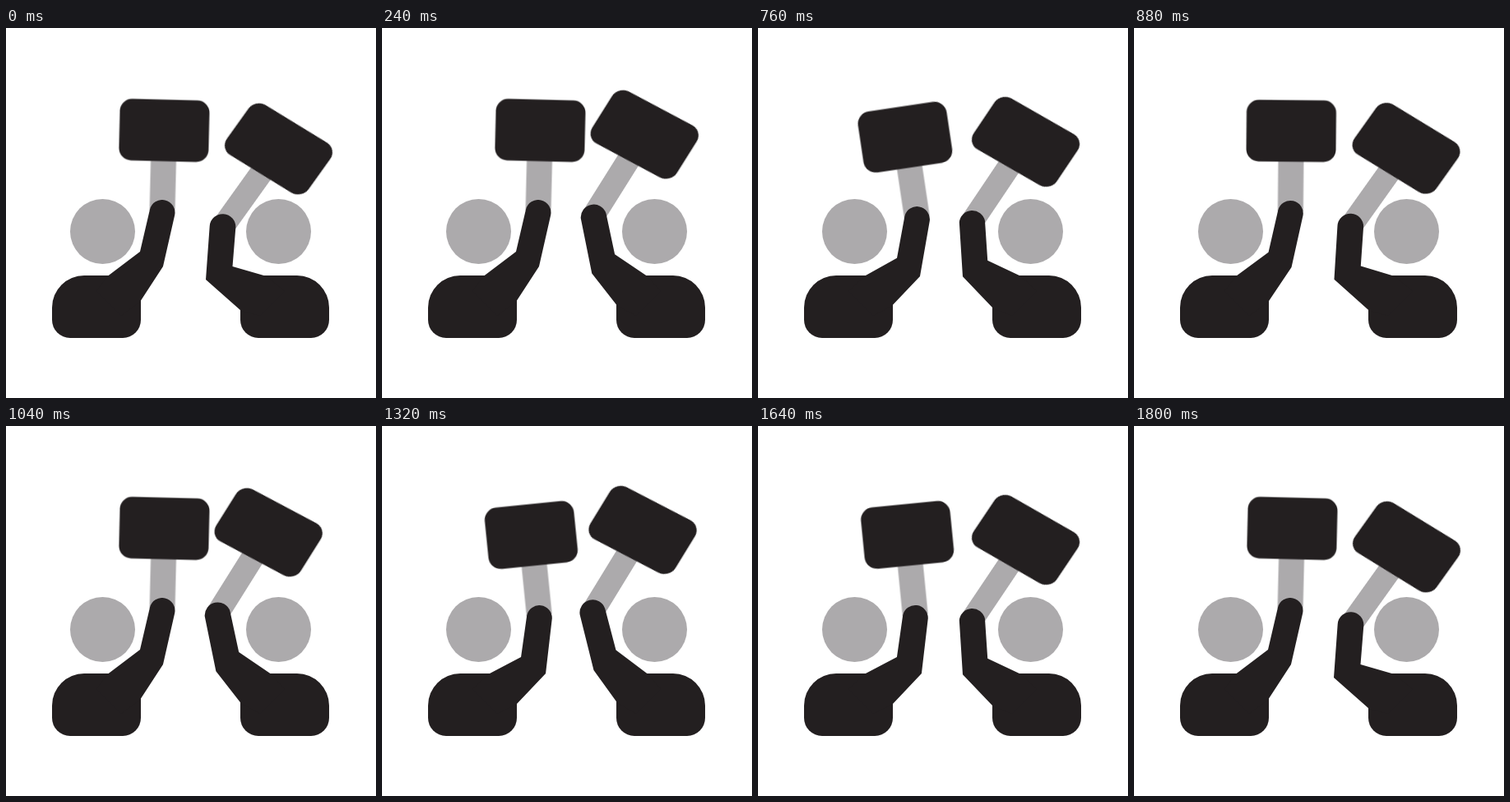
These frames come from a looping animation (450 by 450 pixels, 1.92 s). An HTML page without scripts:

```html
<!DOCTYPE html>
<html lang="en">
<head>
<meta charset="utf-8">
<title>Two people waving signs</title>
<style>
  html, body { margin: 0; width: 100%; height: 100%; overflow: hidden; background: #fff; }
  svg { display: block; width: 100vw; height: 100vh; }
  .ink { fill: #231f20; }
  .grey { fill: #acaaac; }

  .move { animation: 1920ms cubic-bezier(.333, 0, .667, 1) infinite; }
  .arm-l { animation-name: arm-l; }
  .sign-l { animation-name: sign-l; }
  .arm-r { animation-name: arm-r; }
  .sign-r { animation-name: sign-r; }

  /* Left: rest to 320 ms, down at 640, up at 920, rest to 1160, down at 1480, up at 1800 */
  @keyframes arm-l {
    0%, 16.667%, 47.917%, 60.417%, 93.75%, 100% {
      d: path("M124 301.5L163 272L174.9 221A15.5 15.5 0 0 1 205.1 228L191 290L163 333L140 350L110 320Z");
    }
    33.333% {
      d: path("M134 301.5L173 285L180.7 234.2A15.5 15.5 0 0 1 211.3 238.8L201 310L163 341L140 350L110 320Z");
    }
    77.083% {
      d: path("M136 301.5L175 290L177.5 239.1A15.5 15.5 0 0 1 208.5 239.9L207 312L163 345L140 350L110 320Z");
    }
  }
  @keyframes sign-l {
    0%, 16.667%, 47.917%, 60.417%, 93.75%, 100% { transform: translate(190px, 224.5px) rotate(1.4deg); }
    33.333% { transform: translate(196px, 236.5px) rotate(-15deg); }
    77.083% { transform: translate(193px, 239.5px) rotate(-12.8deg); }
  }

  /* Right: up at 320 ms, held to 560, down at 920, quickly up at 1120, held to 1440, down at 1800 */
  @keyframes arm-r {
    0%, 93.75%, 100% {
      d: path("M317 302L275.5 290L279.3 243.1A15.8 15.8 0 0 0 247.7 240.9L243 306L286 344L309 350L339 320Z");
    }
    47.917% {
      d: path("M317 302L275.5 290L279.3 243.1A15.8 15.8 0 0 0 247.7 240.9L243 306L286 344L309 350L339 320Z");
      animation-timing-function: cubic-bezier(.33, 0, .3, 1);
    }
    16.667%, 29.167%, 58.333%, 75% {
      d: path("M323 301.5L284.5 272.5L271.3 222.2A15.8 15.8 0 0 0 240.7 229.8L257.5 297L286 336.5L309 350L339 320Z");
    }
  }
  @keyframes sign-r {
    0%, 93.75%, 100% { transform: translate(263.5px, 242px) rotate(35.6deg); }
    47.917% {
      transform: translate(263.5px, 242px) rotate(35.6deg);
      animation-timing-function: cubic-bezier(.33, 0, .3, 1);
    }
    16.667%, 29.167%, 58.333%, 75% { transform: translate(256px, 226px) rotate(31.5deg); }
  }
</style>
</head>
<body>
<svg viewBox="0 0 450 450">
  <defs>
    <g id="person">
      <circle class="grey" cx="117.5" cy="247.5" r="39.5"/>
      <path class="ink" d="M56 340A39 39 0 0 1 95 301H164V355A22 22 0 0 1 142 377H78A22 22 0 0 1 56 355Z"/>
    </g>
  </defs>

  <use href="#person"/>
  <use href="#person" transform="translate(449) scale(-1 1)"/>

  <g class="move sign-l">
    <rect class="grey" x="-15.5" y="-70" width="31" height="68"/>
    <rect class="ink" x="-54.5" y="-137.5" width="109" height="75" rx="15"/>
  </g>
  <path class="ink move arm-l" d="M124 301.5L163 272L174.9 221A15.5 15.5 0 0 1 205.1 228L191 290L163 333L140 350L110 320Z"/>

  <g class="move sign-r">
    <rect class="grey" x="-14" y="-90" width="28" height="90"/>
    <rect class="ink" x="-58.3" y="-37.3" width="116.6" height="74.6" rx="15" transform="translate(0 -116.8) skewY(-4)"/>
  </g>
  <path class="ink move arm-r" d="M317 302L275.5 290L279.3 243.1A15.8 15.8 0 0 0 247.7 240.9L243 306L286 344L309 350L339 320Z"/>
</svg>
</body>
</html>
```
